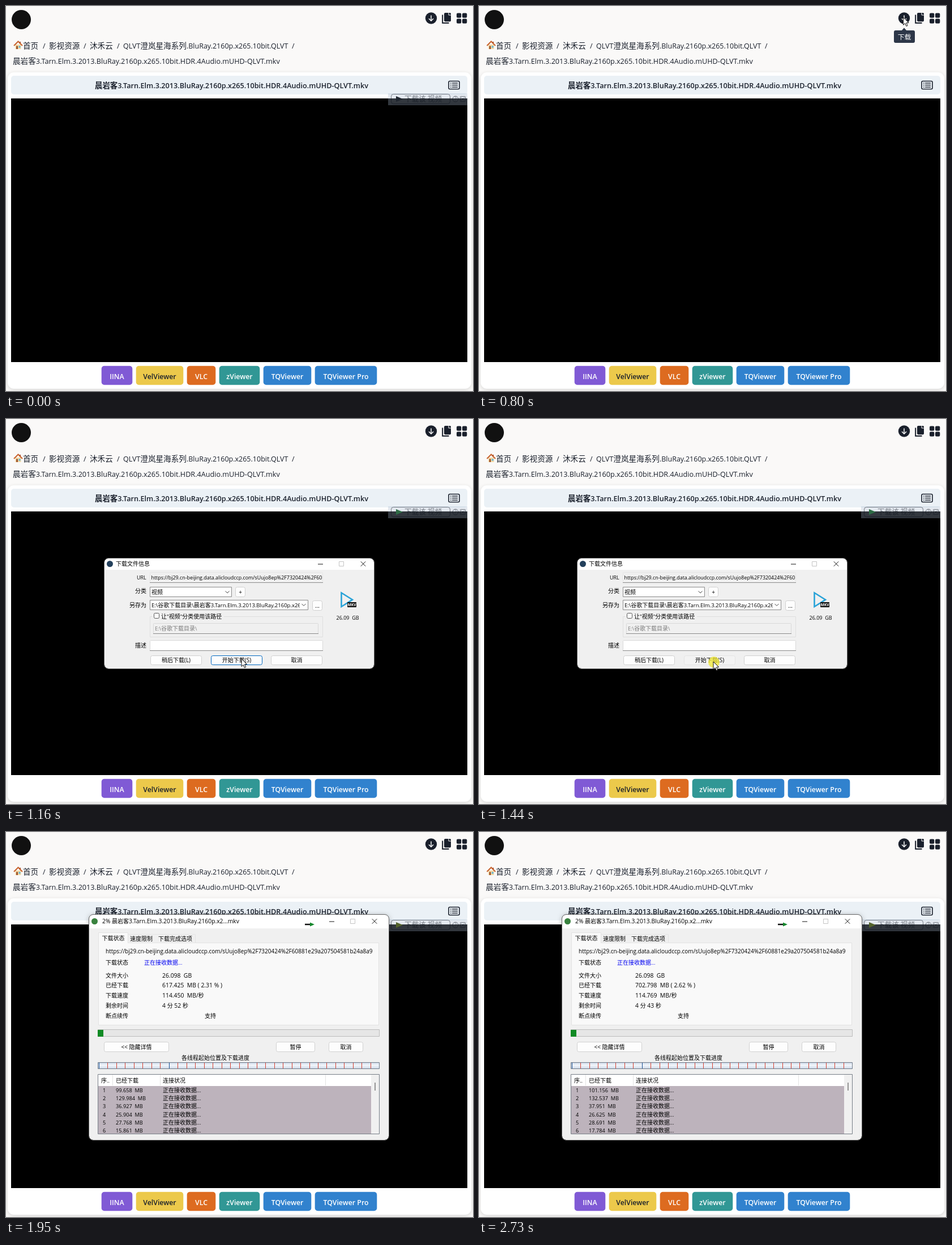
Animation of 825 by 679 pixels, one loop 2850 ms. Source, as an HTML page with a canvas:

```html
<!DOCTYPE html>
<html lang="zh">
<head>
<meta charset="utf-8">
<style>
html, body { margin: 0; width: 100%; height: 100%; overflow: hidden; background: #faf9f8; }
canvas { display: block; }
</style>
</head>
<body>
<canvas id="stage" width="825" height="679"></canvas>
<script>
const c = document.getElementById('stage').getContext('2d');
const LOOP = 2850;
const STEPS = [0, 70, 130, 200, 260, 330, 390, 460, 520, 590, 690, 750, 800, 920, 980, 1040, 1100, 1160,
  1260, 1350, 1440, 1530, 1590, 1650, 1710, 1770, 1830, 1950, 2070, 2130, 2280, 2350, 2430, 2500, 2580, 2650, 2730];
const FILE = '晨岩客3.Tarn.Elm.3.2013.BluRay.2160p.x265.10bit.HDR.4Audio.mUHD-QLVT.mkv';
const URL_TEXT = 'https://bj29.cn-beijing.data.alicloudccp.com/sUujo8ep%2F7320424%2F60881e29a207504581b24a8a9';
const LATIN = '"Open Sans", "Noto Sans", sans-serif';
const HAN = '"Noto Sans CJK SC", "Noto Sans CJK", "Noto Sans CJK JP", sans-serif';
const INK = '#1a202c';

// Linear interpolation through [time, value] keys
function track(t, keys) {
  if (t <= keys[0][0]) return keys[0][1];
  for (let i = 1; i < keys.length; i++) {
    const [t0, a] = keys[i - 1], [t1, b] = keys[i];
    if (t <= t1) return a + (b - a) * (t - t0) / (t1 - t0);
  }
  return keys[keys.length - 1][1];
}

function rect(x, y, w, h, fill, r = 0, stroke, line = 1) {
  c.beginPath();
  c.roundRect(x, y, w, h, r);
  if (fill) { c.fillStyle = fill; c.fill(); }
  if (stroke) { c.strokeStyle = stroke; c.lineWidth = line; c.stroke(); }
}

function path(points, { fill, stroke, width = 1, close = false } = {}) {
  c.beginPath();
  points.forEach(([x, y]) => c.lineTo(x, y));
  if (close) c.closePath();
  if (fill) { c.fillStyle = fill; c.fill(); }
  if (stroke) { c.strokeStyle = stroke; c.lineWidth = width; c.stroke(); }
}

function disc(x, y, r, fill) {
  c.beginPath();
  c.arc(x, y, r, 0, Math.PI * 2);
  c.fillStyle = fill;
  c.fill();
}

// Chinese and Latin runs share a baseline; y is the middle of the line
function text(str, x, y, size, { color = '#000', weight = 400, align = 'left', ratio = 0.92 } = {}) {
  const runs = str.match(/[\u2e80-\u9fff]+|[^\u2e80-\u9fff]+/g).map(s => {
    const han = /[\u2e80-\u9fff]/.test(s);
    const font = `${weight} ${han ? size : size * ratio}px ${han ? HAN : LATIN}`;
    c.font = font;
    return { s, font, w: c.measureText(s).width };
  });
  if (align === 'center') x -= runs.reduce((sum, r) => sum + r.w, 0) / 2;
  c.fillStyle = color;
  for (const r of runs) {
    c.font = r.font;
    c.fillText(r.s, x, y + size * 0.37);
    x += r.w;
  }
}

function clipped(x, y, w, h, draw) {
  c.save();
  c.beginPath();
  c.rect(x, y, w, h);
  c.clip();
  draw();
  c.restore();
}

function topIcons() {
  disc(27, 24, 17, '#111');
  disc(751, 21.5, 10.2, INK);
  path([[751, 16.5], [751, 26]], { stroke: '#fff', width: 1.5 });
  path([[747, 22.3], [751, 26.3], [755, 22.3]], { stroke: '#fff', width: 1.5 });
  path([[771.2, 15.5], [771.2, 30], [782.5, 30]], { stroke: INK, width: 2 });
  rect(774, 12, 12, 15.5, INK, 2);
  path([[782, 12], [782, 16], [786, 16]], { stroke: '#faf9f8' });
  for (const x of [796, 806]) for (const y of [12.5, 22.5]) rect(x, y, 8.3, 8.3, INK, 2);
}

function house() {
  rect(16.5, 68, 10, 8, '#f2d9a6');
  rect(18, 70.5, 3, 5.5, '#a1582f');
  rect(22.5, 70.5, 3, 3, '#57b0d8');
  rect(24, 63, 2, 4, '#9b4a2e');
  path([[14, 70], [21.5, 62.5], [29, 70]], { stroke: '#c8632f', width: 2 });
}

function page() {
  rect(0, 0, 825, 679, '#faf9f8');
  topIcons();
  house();
  const crumbs = [['首页', 30], ['/', 65], ['影视资源', 76], ['/', 137], ['沐禾云', 148], ['/', 196],
    ['QLVT澄岚星海系列.BluRay.2160p.x265.10bit.QLVT', 207], ['/', 505]];
  crumbs.forEach(([s, x]) => text(s, x, 70, 13.6, { color: INK }));
  text(FILE, 12, 97, 13.6, { color: INK, ratio: 0.93 });

  c.save();
  c.shadowColor = 'rgba(0,0,0,.14)';
  c.shadowBlur = 7;
  c.shadowOffsetY = 2;
  rect(3, 117, 819, 558, '#fff', 11);
  c.restore();
  rect(9, 123, 806, 33, '#ebf1f6', 5);
  text(FILE, 398.5, 140, 13.4, { color: INK, weight: 600, align: 'center', ratio: 0.945 });
  rect(782, 132.5, 19, 14, null, 2, INK, 1.6);
  for (const y of [136, 139.5, 143]) {
    rect(785, y - 0.7, 1.6, 1.4, INK);
    rect(788, y - 0.7, 10, 1.4, INK);
  }
  rect(9, 163, 806, 465, '#000');

  const players = [['IINA', 169, 54, '#805ad5'], ['VelViewer', 230, 83, '#ecc94b', INK],
    ['VLC', 320, 50, '#dd6b20'], ['zViewer', 377, 71, '#319795'],
    ['TQViewer', 455, 84, '#3182ce'], ['TQViewer Pro', 546, 109, '#3182ce']];
  for (const [label, x, w, fill, color = '#fff'] of players) {
    rect(x - 0.3, 634.7, w + 0.6, 33.5, fill, 5);
    text(label, x + w / 2, 653, 13.4, { color, weight: 600, align: 'center' });
  }
}

function downloadStrip(arrowColor) {
  const ink = 'rgba(10,16,26,.5)';
  rect(675, 154, 140, 21, 'rgba(165,182,205,.3)');
  rect(680.5, 155.5, 104, 17, null, 4, ink);
  path([[689, 159], [701, 164], [689, 169]], { fill: arrowColor, close: true });
  text('下载该 视频', 704, 163.5, 12.6, { color: ink });
  c.beginPath();
  c.arc(794, 164, 5, 0, 7);
  c.strokeStyle = ink;
  c.stroke();
  text('?', 794, 164, 9, { color: ink, align: 'center' });
  rect(802.5, 159.5, 9, 9, null, 1, ink);
  cross(807, 164, 3, ink);
}

function cross(x, y, r, color) {
  path([[x - r, y - r], [x + r, y + r]], { stroke: color });
  path([[x + r, y - r], [x - r, y + r]], { stroke: color });
}

function tooltip(alpha) {
  c.save();
  c.globalAlpha = alpha;
  path([[746, 44], [751, 38.5], [756, 44]], { fill: '#2d3748', close: true });
  rect(733, 43, 37, 22, '#2d3748', 3);
  text('下载', 751.5, 54.5, 11.8, { color: '#fff', weight: 500, align: 'center' });
  c.restore();
}

function windowFrame(x, y, w, h, { titleHeight, closeX, icon }) {
  c.save();
  c.shadowColor = 'rgba(0,0,0,.35)';
  c.shadowBlur = 8;
  c.shadowOffsetY = 1;
  rect(x, y, w, h, '#f0f0f0', 7);
  c.restore();
  rect(x, y, w, titleHeight, '#fff', [7, 7, 0, 0]);
  rect(x - 0.5, y - 0.5, w + 1, h + 1, null, 7.5, '#6a6a6a');
  const mid = y + titleHeight / 2 - 0.5;
  disc(x + 9.5, mid, 5.5, icon);
  path([[closeX - 80, mid + 0.5], [closeX - 71, mid + 0.5]], { stroke: '#111' });
  rect(closeX - 42.5, mid - 4, 8, 8, null, 0, '#c4c4c4');
  cross(closeX, mid, 4.2, '#111');
}

function button(label, x, y, w, h, { border = '#d0d0d0', fill = '#fdfdfd' } = {}) {
  rect(x + 0.5, y + 0.5, w - 1, h - 1, fill, 3, border);
  text(label, x + w / 2, y + h / 2, 10, { align: 'center', ratio: 1 });
}

function field(x, y, w, h, fill = '#fff', border = '#d9d9d9') {
  rect(x + 0.5, y + 0.5, w - 1, h - 1, fill, 1, border);
  path([[x, y + h - 0.5], [x + w, y + h - 0.5]], { stroke: '#8a8a8a' });
}

function chevron(x, y) {
  path([[x - 3.5, y - 2], [x, y + 1.5], [x + 3.5, y - 2]], { stroke: '#444' });
}

function fileDialog(t) {
  windowFrame(174, 246, 476, 194, { titleHeight: 20, closeX: 631, icon: '#23405c' });
  text('下载文件信息', 194, 255.5, 10);
  text('URL', 231, 279.5, 10, { ratio: 0.9 });
  text('分类', 228, 303, 10);
  text('另存为', 218, 328, 10);
  text('描述', 228, 399, 10);

  field(254, 270, 306, 19, '#f0f0f0', '#e6e6e6');
  clipped(255, 271, 303, 17, () => text(URL_TEXT, 256.5, 279, 10, { ratio: 0.89 }));
  rect(254.5, 296.5, 144, 17, '#fff', 0, '#8a8a8a');
  text('视频', 257, 305.5, 10);
  chevron(391, 305.5);
  button('+', 405, 296, 18, 18);
  rect(254.5, 319.5, 279, 17, '#fff', 0, '#8a8a8a');
  clipped(256, 320, 263, 16, () =>
    text('E:\\谷歌下载目录\\' + FILE.slice(0, FILE.indexOf('x265') + 3), 257, 328, 10, { ratio: 0.95 }));
  chevron(526, 328);
  button('...', 541, 320, 18, 18);

  rect(254.5, 348.5, 305, 36, null, 0, '#dedede');
  rect(259, 342, 126, 12, '#f0f0f0');
  rect(261.5, 342.5, 9, 9, '#fff', 2, '#555');
  text('让"视频"分类使用该路径', 274, 348, 10);
  field(260, 360, 292, 19, '#f0f0f0');
  text('E:\\谷歌下载目录\\', 263, 369, 10, { color: '#7b7b7b' });
  field(254, 390, 306, 19);

  button('稍后下载(L)', 255, 417, 91, 17);
  const pressed = t >= 1350;
  button('开始下载(S)', 362, 417, 91, 17,
    pressed ? { border: '#e4e4e4', fill: '#f3f3f3' } : { border: '#0067c0' });
  button('取消', 468, 417, 91, 17);

  path([[592.5, 306.5], [592.5, 331], [612, 318.7]], { stroke: '#2aa3d8', width: 2.6, close: true });
  rect(603, 323, 16, 9, '#111', 1);
  text('MKV', 611, 327.5, 7, { color: '#fff', weight: 700, align: 'center', ratio: 0.95 });
  if (t >= 1040) text('26.09  GB', 603.5, 350, 10, { align: 'center', ratio: 0.9 });
}

function progressDialog(t) {
  windowFrame(147, 146, 529, 397, { titleHeight: 24, closeX: 651, icon: '#39823f' });
  text('2% ' + FILE.slice(0, FILE.indexOf('x265') + 2) + '...mkv', 170, 157.5, 10, { ratio: 1.03 });
  path([[528, 163], [540, 163]], { stroke: '#111', width: 2.5 });
  path([[537, 159.5], [545, 163], [537, 166.5]], { fill: '#16882d', close: true });

  rect(163.5, 195.5, 495, 145, '#f9f9f9', 0, '#e2e2e2');
  rect(215.5, 180.5, 119, 15, '#f0f0f0', 0, '#e4e4e4');
  rect(164, 178, 51, 19, '#f9f9f9');
  path([[163.5, 196], [163.5, 177.5], [215.5, 177.5], [215.5, 195]], { stroke: '#e2e2e2' });
  text('下载状态', 169.5, 187, 10);
  text('速度限制', 219, 188, 10);
  text('下载完成选项', 269, 188, 10);
  clipped(175, 200, 472, 20, () => text(URL_TEXT, 176, 210, 10, { ratio: 1 }));

  const total = track(t, [[1530, 550.855], [1950, 617.425], [2730, 702.798]]);
  const percent = track(t, [[1530, 2.06], [1950, 2.31], [2730, 2.62]]);
  const speed = track(t, [[1530, 97.897], [1950, 114.45], [2730, 114.769]]);
  const left = Math.round(track(t, [[1530, 59], [1950, 52], [2730, 43]]));
  const info = [['文件大小', 253, '26.098  GB'],
    ['已经下载', 270.5, `${total.toFixed(3)}  MB ( ${percent.toFixed(2)} % )`],
    ['下载速度', 288, `${speed.toFixed(3)}  MB/秒`],
    ['剩余时间', 306, `4 分 ${left} 秒`]];
  text('下载状态', 176, 230, 10);
  text('正在接收数据...', 244, 230, 10, { color: '#0000f0' });
  for (const [label, y, value] of info) {
    text(label, 176, y, 10);
    text(value, 276, y, 10, { ratio: 1.04 });
  }
  text('断点续传', 176, 324, 10);
  text('支持', 351, 324, 10);

  rect(162.5, 348.5, 497, 12, '#e6e6e6', 0, '#bcbcbc');
  rect(162, 349, 10, 12, '#108a24');
  button('<< 隐藏详情', 173, 370, 115, 18);
  button('暂停', 477, 370, 69, 18);
  button('取消', 570, 370, 61, 18);
  text('各线程起始位置及下载进度', 310, 398, 10);

  const shade = c.createLinearGradient(0, 406, 0, 418);
  shade.addColorStop(0, '#c9d5e6');
  shade.addColorStop(0.45, '#f2f6fb');
  shade.addColorStop(1, '#c9d5e6');
  rect(162.5, 406.5, 497, 11, shade, 0, '#707b89');
  for (let i = 0; i < 32; i++) {
    const active = i === 0 || i === 8;
    rect(Math.round(164 + i * 15.48), 407, 1, 10, active ? '#174f92' : '#d8402f');
  }
  threadList(t);
}

function threadList(t) {
  const threads = [[98.224, 99.658, 101.156], [127.326, 129.984, 132.537], [35.707, 36.927, 37.951],
    [25.226, 25.904, 26.625], [26.837, 27.768, 28.691], [14.052, 15.861, 17.784]];
  rect(162.5, 427.5, 497, 105, '#f0f0f0', 0, '#777e87');
  rect(163, 428, 482, 20, '#fff');
  rect(163, 448, 482, 84, '#bdb3bc');
  for (const x of [188.5, 272.5, 564.5]) path([[x, 428], [x, 447]], { stroke: '#e2e2e2' });
  text('序..', 168, 438, 10);
  text('已经下载', 194, 438, 10);
  text('连接状况', 277, 438, 10);
  path([[652, 442], [652, 456]], { stroke: '#777', width: 1.5 });
  clipped(163, 448, 482, 84, () => threads.forEach(([a, b, d], i) => {
    const y = 455.3 + i * 14.2;
    const size = track(t, [[1530, a], [1950, b], [2730, d]]);
    text(String(i + 1), 171, y, 10, { ratio: 0.92 });
    text(size.toFixed(3) + '  MB', 194, y, 10, { ratio: 0.92 });
    text('正在接收数据...', 277, y, 10);
  }));
}

function pointer(x, y) {
  const shape = [[0, 0], [0, 13.5], [3.2, 10.6], [5.4, 15.6], [7.6, 14.6], [5.5, 9.8], [9.7, 9.6]];
  path(shape.map(([dx, dy]) => [x + dx, y + dy]), { fill: '#fff', stroke: '#111', close: true });
}

function draw(time) {
  const t = STEPS.filter(s => s <= time).pop();
  page();
  if (t < 690 || t >= 920) downloadStrip(t < 920 ? '#20262f' : t < 1530 ? '#2e6b45' : '#53622c');
  if (t >= 460 && t < 980) tooltip(t === 460 ? 0.5 : t < 920 ? 1 : 0.9);
  if (t >= 920 && t < 1530) fileDialog(t);
  if (t >= 1530) progressDialog(t);
  if (t < 70 || t >= 1530) return;

  const early = t < 920;
  const x = early ? track(t, [[70, 817], [460, 752], [590, 749.5]])
    : track(t, [[920, 453.5], [1160, 416], [1350, 414]]);
  const y = early ? track(t, [[70, 109], [460, 25], [590, 20]])
    : track(t, [[920, 385.5], [1160, 423], [1350, 428]]);
  if ((t >= 690 && t < 800) || t >= 1350) disc(x + 1, y + 1, 10, 'rgba(240,232,50,.75)');
  pointer(x, y);
}

function frame() {
  draw(performance.now() % LOOP);
  requestAnimationFrame(frame);
}
frame();
</script>
</body>
</html>
```
